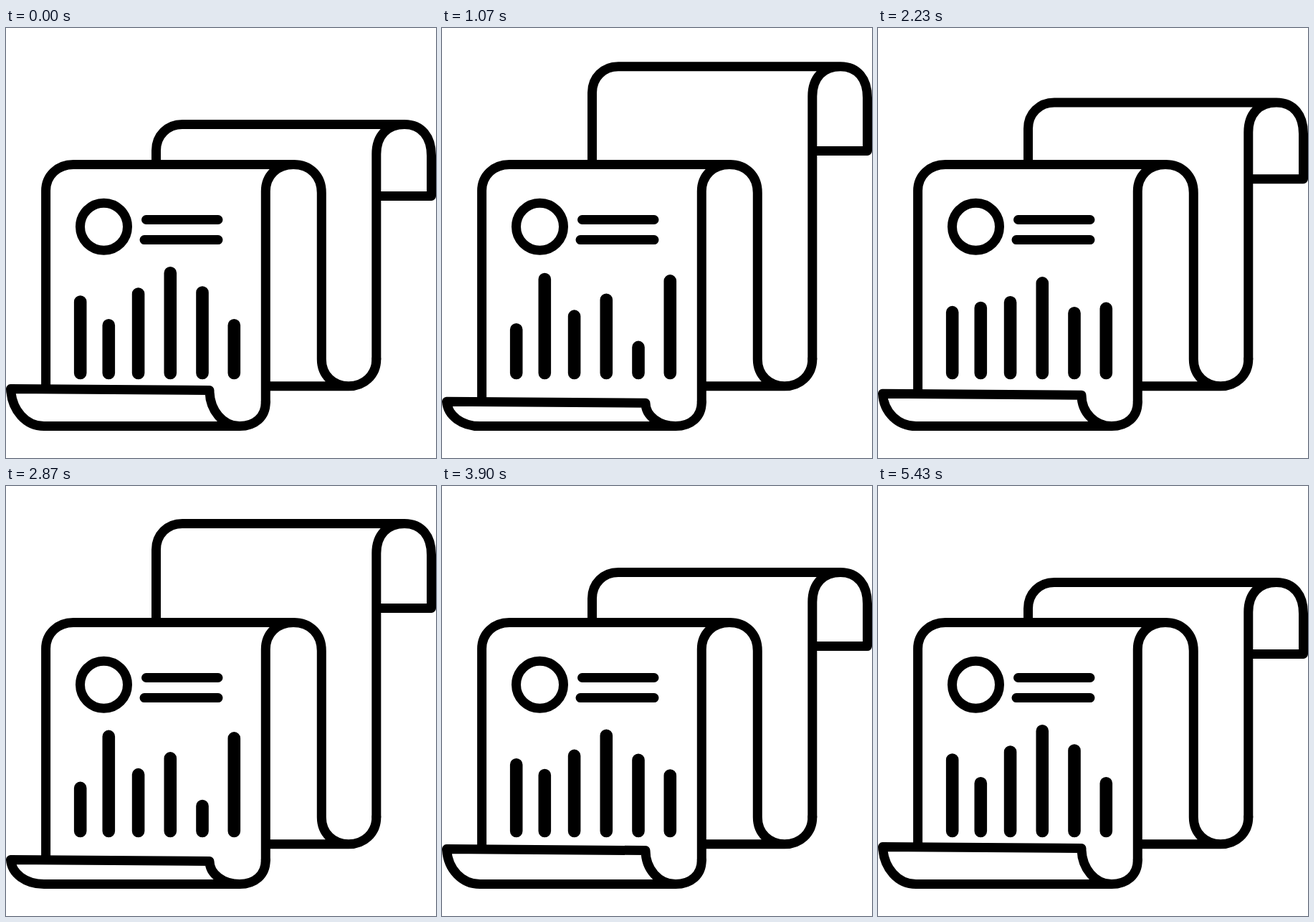
Recreate the animation shown at these times as an HTML page. Size 600 px wide and 600 px high, loop 5460 ms.

```html
<!DOCTYPE html>
<html lang="en">
<head>
<meta charset="utf-8">
<title>Report scroll</title>
<style>
  html, body { margin: 0; height: 100%; overflow: hidden; background: #fff; }
  svg { display: block; width: 100vw; height: 100vh; }
  path, circle { fill: none; stroke: #000; stroke-width: 13; stroke-linecap: round; stroke-linejoin: round; }
  #bars { stroke-width: 17.6; }
</style>
</head>
<body>
<svg viewBox="0 0 600 600">
  <path id="back"/>
  <path d="M516.800 462C516.800 484 500 499.800 478 499.800H364M362.300 522V228C362.300 206 378 190.500 401 190.500C425 190.500 440.300 207 440.300 230V462C440.300 485 457 499.800 478 499.800"/>
  <path id="curl"/>
  <circle cx="136.500" cy="277.300" r="33"/>
  <path d="M195.500 267.500H296M193 295.600H296"/>
  <path id="bars"/>
</svg>
<script>
const LOOP = 5460, FRAME = 100 / 3, LAST = 163, CYCLES = 3, TRAVEL = 91;

// x, resting top, shift of the top per unit of lift
const BARS = [
  [103.7, 382, .48], [143.3, 414.7, -.795], [184.6, 371, .385],
  [229.3, 341.7, .465], [274, 369, .945], [318.3, 414.7, -.765]
];

const byId = id => document.getElementById(id);
const [back, curl, bars] = ['back', 'curl', 'bars'].map(byId);

// Rises and falls once per cycle, slower at the bottom than at the top.
function liftAt(frame) {
  const phase = frame / LAST * CYCLES % 1 * 2;
  const rising = phase < 1;
  const u = rising ? phase : 2 - phase;
  const w = u - (rising ? .08 : .06) * Math.sin(Math.PI * u ** 1.3);
  return TRAVEL * (1 - Math.cos(Math.PI * w)) / 2;
}

function draw(lift) {
  const y = v => v - lift;
  back.setAttribute('d',
    `M209.500 190V${y(171)}C209.500 ${y(150)} 225 ${y(134.5)} 246 ${y(134.5)}H556` +
    `C580 ${y(134.5)} 593.500 ${y(152)} 593.500 ${y(178)}V${234.5 - .78 * lift}H517` +
    `M556 ${y(134.5)}C532 ${y(134.5)} 516.800 ${y(150)} 516.800 ${y(176)}V462`);

  const top = 503.5 + .22 * lift, h = 555.6 - top;
  curl.setAttribute('d',
    `M401 190.500H94C72 190.500 55.600 206 55.600 227V${top}` +
    `M362.300 522C362.300 543 347 555.600 326 555.600H53C28 555.600 8 ${top + .58 * h} 6.500 ${top}` +
    `L284 ${top + 2}C284 ${top + .58 * h} 303 555.600 326 555.600`);

  bars.setAttribute('d', BARS.map(([x, rest, k]) => `M${x} 481.500V${rest + k * lift}`).join(''));
}

const start = performance.now();
function tick() {
  const t = (performance.now() - start) % LOOP;
  draw(liftAt(Math.min(LAST, Math.floor((t + 5) / FRAME))));
  requestAnimationFrame(tick);
}
tick();
</script>
</body>
</html>
```
